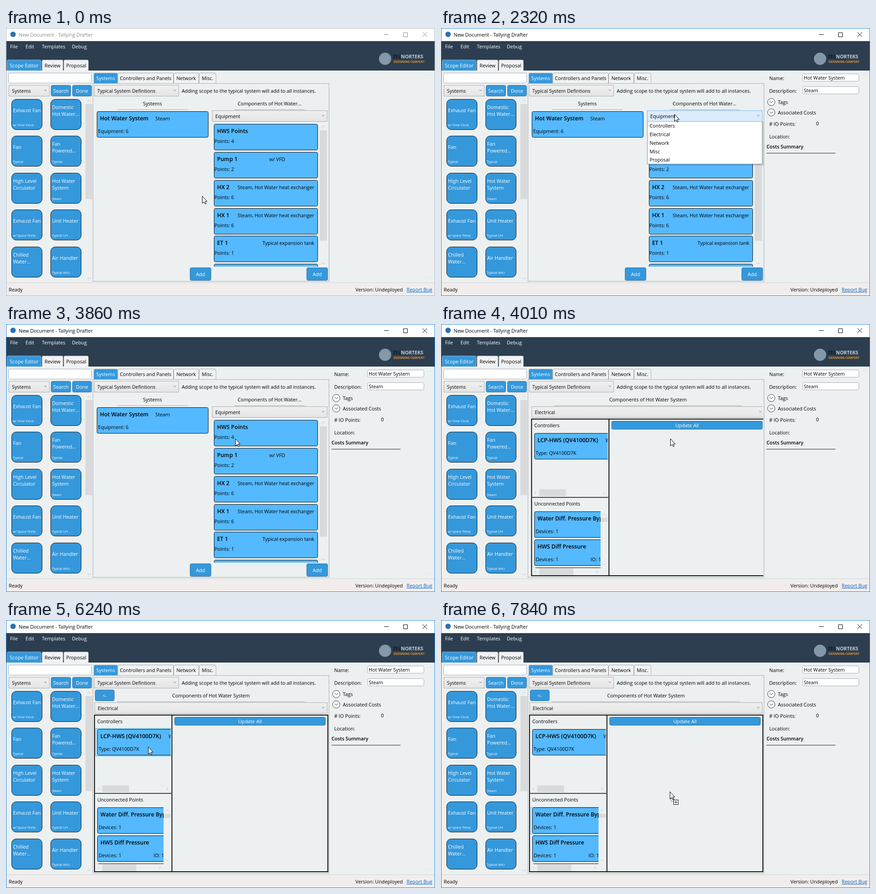
Recreate the animation shown at these times as an HTML page. Size 945 by 592 pixels, loop 8 s.

```html
<!DOCTYPE html>
<html lang="en">
<head>
<meta charset="utf-8">
<title>Scope editor</title>
<style>
  html, body { margin: 0; width: 100%; height: 100%; overflow: hidden; background: #ecf0f1; }
  svg { display: block; }
  text { font: 10.8px "Open Sans", "Noto Sans", sans-serif; fill: #000; white-space: pre; }
  .white { fill: #fff; }
  .bold { font-size: 12.3px; font-weight: 600; }
  .semi { font-weight: 600; }
  .small { font-size: 7.2px; }
  .mid { text-anchor: middle; }
  .end { text-anchor: end; }
  .link { fill: #0066cc; text-decoration: underline; }
  .brand { font-size: 10.6px; font-weight: 700; fill: #c6cdd4; }
  .tagline { font-size: 6.3px; font-weight: 700; fill: #e8952f; }
  #idle text { fill: #8a8a8a; }
</style>
</head>
<body>
<svg id="stage" width="945" height="592" viewBox="0 0 945 592"></svg>
<script>
const BLUE = '#3498db', CARD = '#54b9ff', PAGE = '#ecf0f1', GREY = '#acacac';

// Shape helpers: boxes are given by their outer pixel edges.
const rect = (x, y, w, h, fill, stroke, r = 0) => stroke
  ? `<rect x="${x + .5}" y="${y + .5}" width="${w - 1}" height="${h - 1}" rx="${r}" fill="${fill}" stroke="${stroke}"/>`
  : `<rect x="${x}" y="${y}" width="${w}" height="${h}" rx="${r}" fill="${fill}"/>`;
const text = (x, middle, s, cls = '') => `<text x="${x}" y="${middle + 4}" class="${cls}">${s}</text>`;
const path = (d, stroke, width = 1, fill = 'none') =>
  `<path d="${d}" fill="${fill}" stroke="${stroke}" stroke-width="${width}"/>`;
const group = (id, body, attrs = '') => `<g id="${id}" ${attrs}>${body}</g>`;
const clip = (id, x, y, w, h) => `<clipPath id="${id}">${rect(x, y, w, h, '#000')}</clipPath>`;
const clipped = (id, body) => `<g clip-path="url(#${id})">${body}</g>`;
const chevron = (x, y, angle = 0, size = 3, color = '#b9bcbe') =>
  `<g transform="translate(${x} ${y}) rotate(${angle})">` +
  path(`M${-size} ${-size / 2}L0 ${size / 2}L${size} ${-size / 2}`, color) + '</g>';

// Control helpers
const button = (x, y, w, h, label) =>
  rect(x, y, w, h, BLUE, '#3c7299', 3) + text(x + w / 2, y + h / 2, label, 'white mid');
const combo = (x, y, w, h, label, hot) =>
  rect(x, y, w, h, hot ? '#dcecfc' : 'url(#face)', hot ? '#7eb4ea' : GREY) +
  text(x + (h > 24 ? 7 : 5.5), y + h / 2, label) + chevron(x + w - 9, y + h / 2 - 1, 0, 2.5, '#606060');
const input = (x, y, w, h, value) => rect(x, y, w, h, '#fff', '#abadb3', 3) + text(x + 3, y + h / 2, value);
const tab = (x, y, w, h, label, active) =>
  path(`M${x + .5} ${y + h}v${3 - h}q0-2.5 2.5-2.5h${w - 6}q2.5 0 2.5 2.5v${h - 3}`, GREY, 1, active ? BLUE : '#f0f2f3') +
  text(x + w / 2, y + h / 2 + .5, label, active ? 'white mid' : 'mid');
const heading = (center, label, half) =>
  text(center, 167, label, 'mid') + path(`M${center - half} 180.5h${2 * half}`, '#a5a8aa');
const card = (x, y, w, title, note) =>
  rect(x, y, w, 58, CARD, '#111', 3) + text(x + 7, y + 16, title, 'bold') + text(x + 3, y + 44, note);
const pointsCard = (y, title, count, detail = '', right = 679) =>
  rect(458, y, 229, 58, CARD, '#111', 3) + text(465, y + 16, title, 'bold') +
  text(459, y + 37.5, 'Points: ' + count) + text(right, y + 16, detail, 'end');
const highlight = (id, x, y, w, h) => group(id, rect(x, y, w, h, '#bcdeee', '#4fb2e0'));

const tile = (x, y, lines, note = '') =>
  rect(x, y, 68, 68, BLUE, '#10161c', 10) +
  lines.map((s, i) => text(x + 3.5, y + (lines.length > 1 ? 17.5 : 25) + 15 * i, s, 'white')).join('') +
  text(x + 3, y + 56, note, 'white small');

const tiles = [
  [['Exhaust Fan'], 'w/ Time Clock'], [['Domestic', 'Hot Water...']],
  [['Fan'], 'Typical'], [['Fan', 'Powered...'], 'Typical'],
  [['High Level', 'Circulator']], [['Hot Water', 'System'], 'Steam'],
  [['Exhaust Fan'], 'w/ Space Temp'], [['Unit Heater'], 'Typical UH'],
  [['Chilled', 'Water...']], [['Air Handler'], 'Typical AHU']
].map(([lines, note], i) => tile(i % 2 ? 98 : 12, Math.round(157 + 81.4 * (i >> 1)), lines, note)).join('');

const titleBar = (id, color, edge) => group(id,
  rect(0, 0, 945, 592, 'none', edge) +
  text(28, 15, 'New Document - Tallying Drafter') +
  path('M833 14.5h10M875.5 10.5h9v9h-9zM917.5 9.5l10 10M927.5 9.5l-10 10', color));

const chrome =
  rect(0, 0, 945, 592, PAGE) + rect(0, 0, 945, 29, '#fff') + rect(0, 29, 945, 65, '#2c3e50') +
  `<circle cx="15.500" cy="14" r="6" fill="#2f6fb5"/>` +
  [[9, 'File'], [43, 'Edit'], [79, 'Templates'], [145, 'Debug']].map(([x, s]) => text(x, 40.5, s, 'white')).join('') +
  tab(2, 70, 76, 24, 'Scope Editor', true) + tab(79, 70, 47, 24, 'Review') + tab(127, 70, 55, 24, 'Proposal') +
  `<circle cx="835" cy="68" r="13.500" fill="#8499a8"/>` +
  text(852, 63, '<tspan fill="#11181f">ZEL</tspan>NORTEKS', 'brand') +
  text(854, 72.500, 'DESIGNING COMFORT', 'tagline') +
  rect(0, 562, 945, 30, '#f1eded') + path('M0 562.5H945', '#d0d3d4') +
  text(6, 578, 'Ready') + text(874, 578, 'Version: Undeployed', 'end') + text(939, 578, 'Report Bug', 'link end');

const leftPanel =
  input(5, 99, 184, 23, '') + combo(6, 126, 90, 25, 'Systems') +
  button(99, 126, 44, 25, 'Search') + button(146, 126, 43, 25, 'Done') + tiles +
  rect(175, 168, 15, 210, '#d8dadb') + chevron(183, 161, 180) + chevron(183, 553);

const mainPanel =
  rect(191, 122, 521, 438, PAGE, GREY) +
  tab(193, 99, 53, 23, 'Systems', true) + tab(246, 99, 123, 23, 'Controllers and Panels') +
  tab(369, 99, 56, 23, 'Network') + tab(425, 99, 38, 23, 'Misc.') +
  combo(194, 126, 187, 25, 'Typical System Defintions') +
  text(387, 139, 'Adding scope to the typical system will add to all instances.') +
  chevron(933, 104, 180, 3, '#dadddf') + chevron(933, 552, 0, 3, '#dadddf');

const listView =
  heading(322.5, 'Systems', 77.5) + heading(580.5, 'Components of Hot Water...', 77.5) +
  highlight('systemMark', 197, 182, 253, 62) +
  card(200, 184, 246, 'Hot Water System', 'Equipment: 6') + text(329, 200, 'Steam') +
  combo(454, 182, 254, 25, 'Equipment') +
  group('comboHot', combo(454, 182, 254, 25, 'Equipment', true)) +
  clipped('cardsClip',
    pointsCard(212, 'HWS Points', 4) + pointsCard(274, 'Pump 1', 2, 'w/ VFD', 615) +
    pointsCard(336, 'HX 2', 6, 'Steam, Hot Water heat exchanger') +
    pointsCard(398, 'HX 1', 6, 'Steam, Hot Water heat exchanger') +
    pointsCard(459, 'ET 1', 1, 'Typical expansion tank') + pointsCard(521, '', '')) +
  rect(691, 226, 16, 244, '#d8dadb') + chevron(699, 218, 180) + chevron(699, 520) +
  button(405, 529, 47, 29, 'Add') + button(662, 529, 47, 29, 'Add');

const electricalView =
  rect(193, 154, 518, 405, PAGE) +
  group('back', button(196, 154, 43, 25, '&lt;-')) +
  heading(451.5, 'Components of Hot Water System', 206.5) +
  combo(195, 182, 513, 25, 'Electrical') +
  path('M195 210H709V556H195ZM365.500 210V556', '#111', 2) + path('M195 383H366', '#444', 2) +
  button(371, 214, 333, 19, 'Update All') +
  text(201, 224, 'Controllers') +
  clipped('controllerClip',
    highlight('controllerMark', 197, 239, 200, 62) +
    card(201, 241, 220, 'LCP-HWS (QV4100D7K)', 'Type: QV4100D7K') + text(358, 257, 'W')) +
  rect(212, 365, 59, 15, '#d8dadb') + chevron(204, 373, 90) + chevron(355, 373, -90) +
  text(201, 397, 'Unconnected Points') +
  clipped('pointClip',
    highlight('pointMark', 197, 413, 200, 61) +
    card(201, 414, 200, 'Water Diff. Pressure Bypass', 'Devices: 1') +
    card(201, 476, 200, 'HWS Diff Pressure', 'Devices: 1') + text(325, 520, 'IO: 1') +
    card(201, 538, 200, '', '')) +
  rect(347, 428, 16, 9, '#d8dadb') + chevron(355, 421, 180) + chevron(355, 531) +
  rect(212, 540, 75, 15, '#d8dadb') + chevron(204, 547, 90) + chevron(339, 547, -90);

const expander = (y, label) =>
  `<circle cx="727.500" cy="${y}" r="8" fill="#fff" stroke="#333"/>` +
  chevron(727.5, y, 0, 3.5, '#222') + text(742, y + .5, label);
const properties =
  text(723, 111, 'Name:') + input(796, 101, 125, 17, 'Hot Water System') +
  text(723, 139, 'Description:') + input(796, 129, 125, 17, 'Steam') +
  expander(163.5, 'Tags') + expander(186.5, 'Associated Costs') +
  text(723, 212, '# IO Points:') + text(826, 211, '0') + text(723, 240, 'Location:') +
  text(717, 262, 'Costs Summary', 'semi') + path('M717 276.5H869', '#2a1a20');

const ITEM = 18.75;
const popup =
  rect(458, 211, 253, 113, '#0002') + rect(454, 207, 254, 114, '#fff', '#8a8a8a') +
  group('itemMark', rect(455, 208, 252, 19, '#d1e8fb', '#78c0ea')) +
  ['Equipment', 'Controllers', 'Electrical', 'Network', 'Misc', 'Proposal']
    .map((s, i) => text(459.5, 217.5 + ITEM * i, s)).join('');

const pointer =
  path('M.5 .5V16.5L4.200 13L6.700 18L8.800 17L6.500 12H11Z', '#000', 1, '#fff') +
  group('dragIcon',
    `<rect x="2.500" y="15.500" width="7" height="6" fill="none" stroke="#222" stroke-dasharray="1 1"/>` +
    rect(8, 18, 11, 11, '#fff', '#000') + path('M13.5 20.500v6M10.500 23.500h6', '#000'));

const stage = document.getElementById('stage');
stage.innerHTML =
  `<defs><linearGradient id="face" x2="0" y2="1"><stop stop-color="#f0f0f0"/><stop offset="1" stop-color="#e5e5e5"/></linearGradient>` +
  clip('cardsClip', 454, 210, 236, 317) + clip('viewClip', 193, 154, 517, 405) +
  clip('controllerClip', 196, 235, 167, 128) + clip('pointClip', 196, 410, 151, 129) +
  clip('popupClip', 450, 207, 265, 120) + '</defs>' +
  chrome + leftPanel + mainPanel + listView +
  clipped('viewClip', group('electrical', electricalView)) +
  group('properties', properties) +
  titleBar('idle', '#8a8a8a', '#a9b4be') + titleBar('active', '#000', '#1883d7') +
  clipped('popupClip', group('popup', popup)) + group('pointer', pointer);

const el = id => document.getElementById(id);
const show = (id, on) => el(id).setAttribute('visibility', on ? 'inherit' : 'hidden');
const shift = (id, x, y) => el(id).setAttribute('transform', `translate(${x} ${y})`);

// Pointer moves: first step, last step, step count, end x, end y, easing
const smooth = u => u * u * (3 - 2 * u), linear = u => u;
const moves = [
  [530, 1150, 9, 321, 222, smooth],
  [1310, 1540, 4, 465, 207, linear],
  [1617, 1850, 4, 514, 190, linear],
  [2860, 2940, 2, 512, 215, linear],
  [3010, 3460, 7, 505, 253, smooth],
  [4860, 5310, 7, 314, 275, smooth],
  [6240, 6880, 9, 285, 433, smooth],
  [7090, 7840, 11, 504, 379, smooth]
];

function pointerAt(t) {
  let x = 432, y = 371;
  for (const [start, end, steps, toX, toY, ease] of moves) {
    if (t < start) break;
    const step = Math.floor((t - start) / (end - start) * (steps - 1) + 1e-6) + 1;
    const k = ease(Math.min(1, step / steps));
    x += (toX - x) * k;
    y += (toY - y) * k;
  }
  return [Math.round(x), Math.round(y)];
}

function draw(t) {
  const within = (from, to) => t >= from && t < to;
  const [x, y] = pointerAt(t);
  shift('pointer', x, y);
  show('dragIcon', t >= 7090 && y < 423);

  show('idle', t < 1150);
  show('active', t >= 1150);
  show('properties', t >= 1310);
  show('systemMark', within(995, 2230));
  show('comboHot', within(1617, 2860));

  show('popup', within(2230, 3860));
  shift('popup', 0, t < 2315 ? -70 : t < 2400 ? -20 : 0);
  shift('itemMark', 0, ITEM * Math.max(0, Math.floor((y - 208) / ITEM)));

  show('electrical', t >= 3950);
  shift('electrical', t < 4010 ? 100 : t < 4090 ? 4.5 : 0, 0);
  show('back', t >= 4170);
  show('controllerMark', within(5160, 6880));
  show('pointMark', t >= 6720);
  el('controllerMark').setAttribute('opacity', t < 5620 ? .6 : 1);
  el('pointMark').setAttribute('opacity', .6);
}

function frame() {
  draw(performance.now() % 8000);
  requestAnimationFrame(frame);
}
frame();
</script>
</body>
</html>
```
